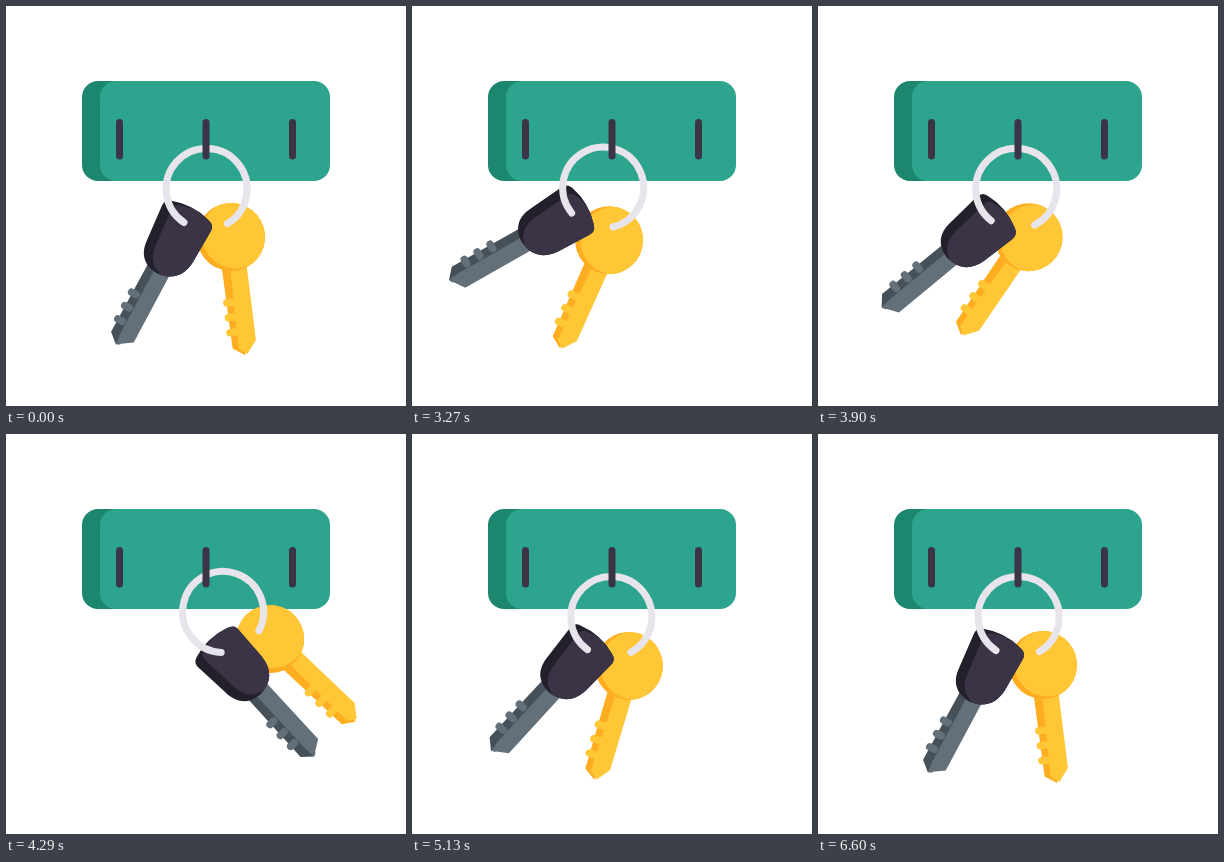
Write an HTML page without scripts that moves like this. It is 400x400 px and loops after 6630 ms.

```html
<!DOCTYPE html>
<html lang="en">
<head>
<meta charset="utf-8">
<title>Keys on a rack</title>
<style>
  @property --ring { syntax: "<angle>"; inherits: true; initial-value: 0deg; }
  @property --dark { syntax: "<angle>"; inherits: true; initial-value: 0deg; }
  @property --gold { syntax: "<angle>"; inherits: true; initial-value: 0deg; }

  html, body { margin: 0; width: 100%; height: 100%; overflow: hidden; background: #fff; }

  svg {
    display: block;
    width: 100%;
    height: 100%;
    animation: ring 6630ms infinite, dark 6630ms infinite, gold 6630ms infinite;
    animation-timing-function: cubic-bezier(.37, 0, .63, 1);
  }

  .swing, .key { transform-box: view-box; }
  .swing { transform-origin: 200px 151px; transform: rotate(var(--ring)); }
  .key.gold { transform-origin: 222px 218px; transform: rotate(calc(var(--gold) - var(--ring))); }
  .key.dark { transform-origin: 178px 216px; transform: rotate(calc(var(--dark) - var(--ring))); }

  /* Damped swings: the keys trail the ring */
  @keyframes ring {
    0%, 44.95% { --ring: 0deg; }
    54% { --ring: 36deg; }
    64.1% { --ring: -32deg; }
    72.7% { --ring: 27deg; }
    80.25% { --ring: -9deg; }
    86.3% { --ring: 2deg; }
    94.3%, 100% { --ring: 0deg; }
  }
  @keyframes dark {
    0%, 44.95% { --dark: 0deg; }
    54.9% { --dark: 79deg; }
    64.25% { --dark: -71.5deg; }
    73.9% { --dark: 47deg; }
    81% { --dark: -20deg; }
    88.85% { --dark: 8deg; }
    97.3%, 100% { --dark: 0deg; }
  }
  @keyframes gold {
    0%, 44.95% { --gold: 0deg; }
    54.75% { --gold: 75deg; }
    66.2% { --gold: -44deg; }
    76.6% { --gold: 25deg; }
    82.65% { --gold: -3.5deg; }
    89.75% { --gold: 2deg; }
    97.3%, 100% { --gold: 0deg; }
  }

  .hooks, .teeth, .loop { fill: none; stroke-linecap: round; stroke-width: 7; }
  .hooks { stroke: #3a3446; }
  .loop { stroke: #e8e4ec; }
  .teeth { stroke-width: 7.5; }
</style>
</head>
<body>
<svg viewBox="0 0 400 400">
  <defs>
    <circle id="bow" r="34"/>
    <path id="fob" d="M-21-13Q0-20 21-13Q29-11 28-3L26.500 32C25 48 16 57 0 58C-16 57-24 48-24.500 32L-27-3Q-28-11-21-13Z"/>
    <clipPath id="bowClip"><use href="#bow"/></clipPath>
    <clipPath id="fobClip"><use href="#fob"/></clipPath>
  </defs>

  <rect x="76" y="75" width="60" height="100" rx="16" fill="#1c876e"/>
  <rect x="94" y="75" width="230" height="100" rx="16" fill="#2da48e"/>

  <g class="swing">
    <g class="key gold">
      <g transform="translate(225 231) rotate(-6)">
        <path fill="#ffad20" d="M-12.500 26H0L2 119L-10 111Z"/>
        <path fill="#ffc636" d="M-4 26H12.500L14 105L4 118L-4 112Z"/>
        <path class="teeth" stroke="#ffc636" d="M-11 65h6m-6 15h6m-6 15h6"/>
        <use href="#bow" fill="#ffad20"/>
        <g clip-path="url(#bowClip)"><use href="#bow" x="5" y="-2" fill="#ffc636"/></g>
      </g>
    </g>
    <g class="key dark">
      <g transform="translate(178 216) rotate(27.5)">
        <path fill="#465058" d="M-12.500 45H0V138L-4 140L-14 131Z"/>
        <path fill="#63707a" d="M-4 45H12L11 130L-4 140L-5 128Z"/>
        <path class="teeth" stroke="#63707a" d="M-14 86.500h5m-5 15h5m-5 15h5"/>
        <use href="#fob" fill="#231f2b"/>
        <g clip-path="url(#fobClip)"><use href="#fob" x="10" fill="#3a3446"/></g>
      </g>
    </g>
    <path class="loop" d="M178 216.500A40.500 40.500 0 1 1 221.500 217.600"/>
  </g>

  <path class="hooks" d="M113.500 116.500v33.500M200 116.500v33.500M286.500 116.500v33.500"/>
</svg>
</body>
</html>
```
